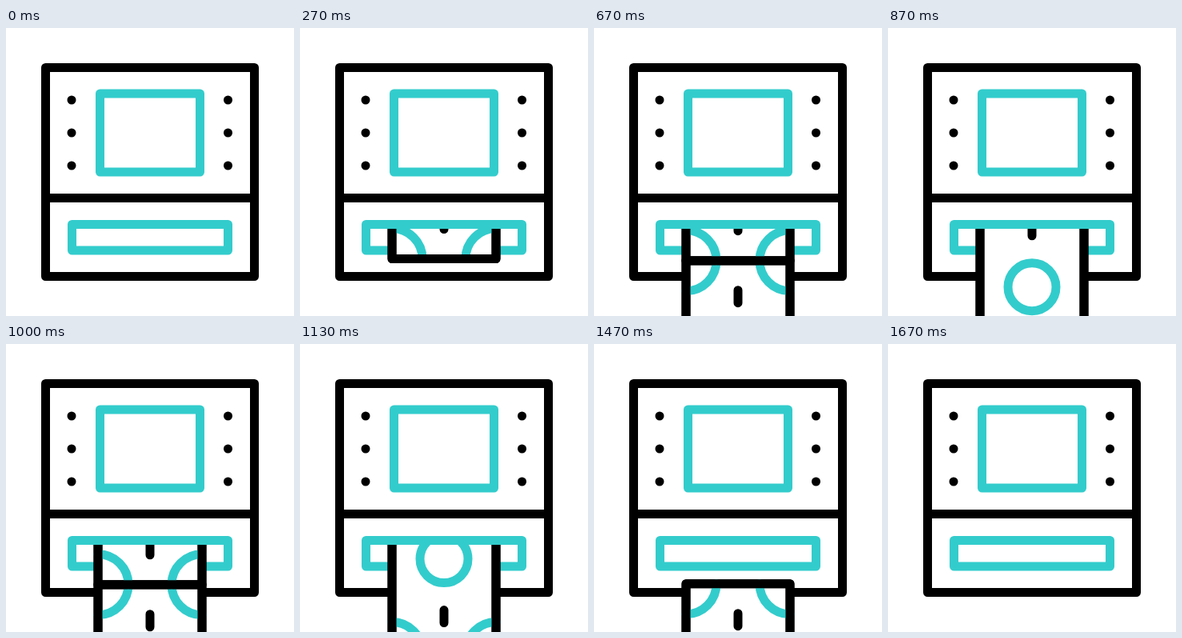
An HTML page that plays this animation: 360x360 px, repeating every 2000 ms.

```html
<!DOCTYPE html>
<html lang="en">
<head>
<meta charset="utf-8">
<title>Cash machine</title>
<style>
  html, body { margin: 0; height: 100%; overflow: hidden; background: #fff; }
  svg { display: block; width: 100vw; height: 100vh; }
  .line { fill: none; stroke: #000; stroke-width: 11; stroke-linecap: round; stroke-linejoin: round; }
  .teal { stroke: #33cccc; }
  .paper { fill: #fff; }
</style>
</head>
<body>
<svg viewBox="0 0 360 360">
  <defs>
    <clipPath id="outlet"><rect y="251" width="360" height="109"/></clipPath>
    <!-- One banknote; its bottom edge lies at y = 0 -->
    <g id="note">
      <rect class="line paper" x="115" y="-234" width="130" height="234"/>
      <path class="line teal" d="M115-196a38 38 0 0 0 38-38M245-196a38 38 0 0 1-38-38M115-38a38 38 0 0 1 38 38M245-38a38 38 0 0 0-38 38"/>
      <circle class="line teal" cx="180" cy="-117" r="30"/>
      <path class="line" d="M180-197v16M180-53v16"/>
      <rect class="line" x="115" y="-234" width="130" height="234"/>
    </g>
  </defs>
  <rect class="line" x="49.5" y="49.5" width="261" height="261"/>
  <path class="line" d="M49.5 212.5h261"/>
  <path class="line" d="M82 90h.01M82 131h.01M82 172h.01M277.5 90h.01M277.5 131h.01M277.5 172h.01"/>
  <rect class="line teal" x="117.5" y="82" width="125" height="98"/>
  <rect class="line teal" x="82.5" y="245.5" width="195" height="32.5"/>
  <g clip-path="url(#outlet)">
    <g id="strip">
      <use href="#note"/>
      <use href="#note" y="-234"/>
      <use href="#note" y="-468"/>
    </g>
  </g>
</svg>
<script>
const LOOP = 2000;
const SLOT_Y = 245;
const strip = document.getElementById('strip');

// [time in ms, distance fed out, speed in px per ms]
const feed = [
  [130, 0, .2], [470, 143, .57], [670, 279, .73], [870, 429, .74],
  [1130, 608, .6], [1330, 702, .4], [1670, 826, .32]
];

// Cubic Hermite interpolation between the feed points
function distance(time) {
  const end = feed.findIndex(point => point[0] > time);
  if (end === 0) return 0;
  if (end < 0) return feed[feed.length - 1][1];
  const [t0, d0, v0] = feed[end - 1];
  const [t1, d1, v1] = feed[end];
  const span = t1 - t0;
  const u = (time - t0) / span;
  const w = 1 - u;
  return w * w * ((1 + 2 * u) * d0 + u * span * v0)
       + u * u * ((1 + 2 * w) * d1 - w * span * v1);
}

function draw() {
  const time = performance.now() % LOOP;
  strip.setAttribute('transform', `translate(0 ${SLOT_Y + distance(time)})`);
  requestAnimationFrame(draw);
}
draw();
</script>
</body>
</html>
```
